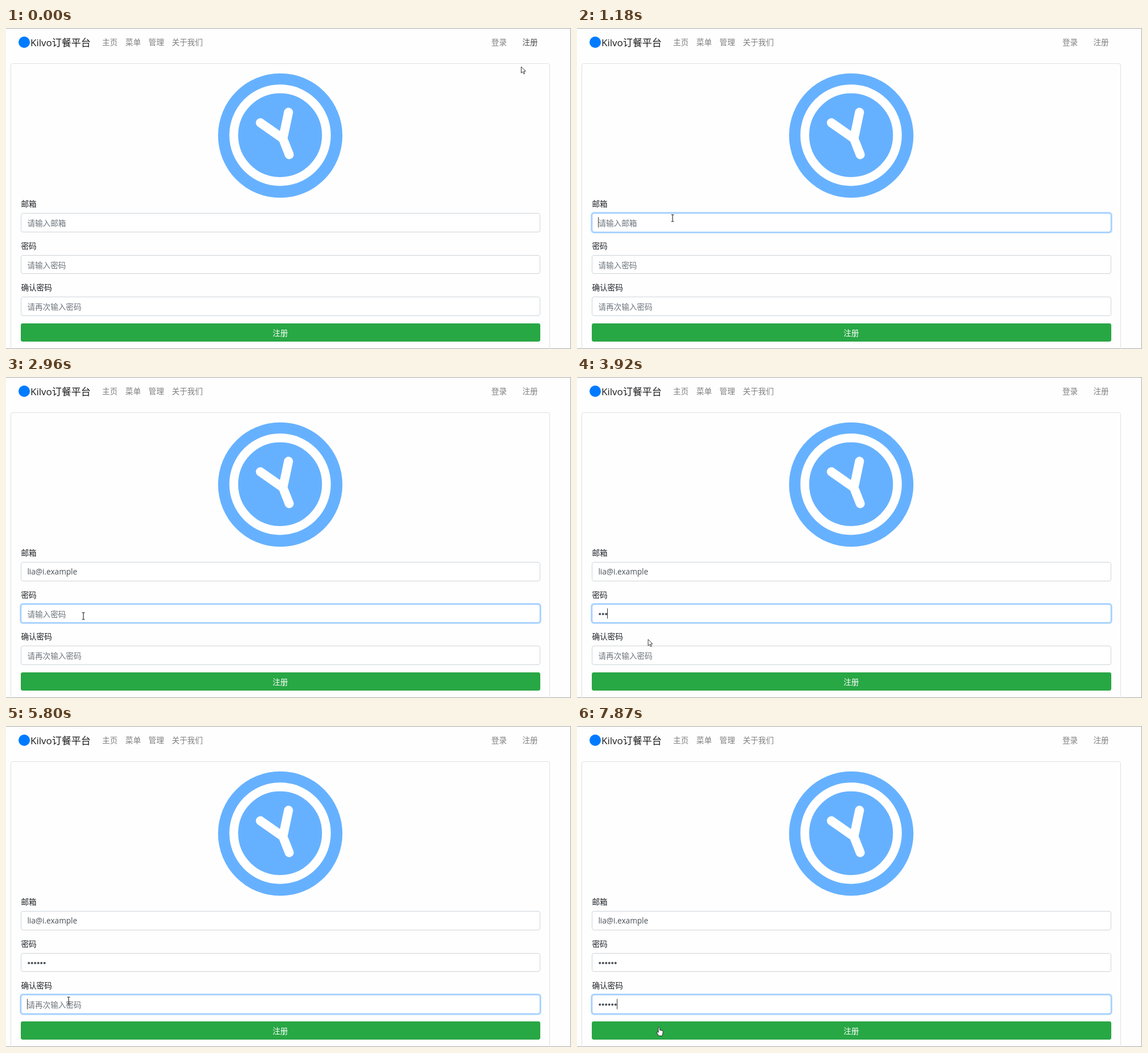
Animation of 993 by 564 pixels, one loop 8 s. Source, as an HTML page:

```html
<!DOCTYPE html>
<html lang="zh">
<head>
<meta charset="utf-8">
<title>注册</title>
<style>
  html, body { margin: 0; width: 100%; height: 100%; overflow: hidden; background: #fefefe; }
  svg { display: block; }
  text { font: 13.6px "Open Sans", "Noto Sans CJK SC", "Noto Sans CJK", sans-serif; fill: #212529; }
  .brand { font-size: 17px; fill: rgba(0, 0, 0, .9); }
  .nav { fill: rgba(0, 0, 0, .5); }
  .nav.hover { fill: rgba(0, 0, 0, .7); }
  .hint { fill: #6c757d; }
  .value { fill: #495057; }
  .button { fill: #fff; font-weight: 500; text-anchor: middle; }
</style>
</head>
<body>
<svg width="993" height="564" viewBox="0 0 993 564">
  <path d="M0 .5H992.5V563.5H0" fill="none" stroke="#a9a9a9"/>
  <rect x="8.5" y="62.5" width="947" height="520" rx="3.4" fill="none" stroke="#e0e0e0"/>
  <circle cx="32" cy="25" r="10" fill="#007bff"/>
  <text class="brand" x="43" y="32">Kilvo订餐平台</text>
  <g id="menu"></g>

  <circle cx="482" cy="189" r="109.3" fill="#66b1ff"/>
  <circle cx="481.7" cy="188.3" r="81.4" fill="none" stroke="#fff" stroke-width="15.5"/>
  <path d="M447 166.5L486.7 194.3L496.5 148M486.7 194.3L497.8 222.5" fill="none" stroke="#fff"
        stroke-width="15.8" stroke-linecap="round" stroke-linejoin="round"/>

  <g id="form"></g>
  <rect x="26" y="519" width="913" height="32" rx="3.4" fill="#28a745"/>
  <text class="button" x="482" y="541">注册</text>
  <path id="caret" stroke="#333"/>

  <g id="cursor" stroke="#222">
    <path id="arrow" d="M.5 .5V11.6L3 9.2L4.9 13.2L6.7 12.4L4.9 8.5H8.3Z" fill="#fff" stroke-width=".9"/>
    <path id="beam" d="M-2.5 -6H-.6L0 -5.5L.6 -6H2.5M0 -5.5V5.5M-2.5 6H-.6L0 5.5L.6 6H2.5" fill="none" stroke-width="1.1"/>
    <path id="hand" d="M-1.3 .9Q0 -.8 1.3 .9V5.2L5.6 6.2Q7.2 6.8 7 8.6L6.2 12.4L5.4 15.5H-.4L-4 10.2Q-4.4 8.2 -2.6 8.4L-1.3 9.6Z" fill="#fff"/>
  </g>
</svg>
<script>
const LOOP = 8000;
const SAMPLE = 145;   // pointer is redrawn about this often
const BLINK = 520;
const FOCUS_LAG = 130;
const FONT = 13.6;
const DOT_STEP = 5.5;
const EMAIL = "lia@i.example";
const $ = id => document.getElementById(id);
const snap = v => Math.floor(v) + .5;
const show = (el, on) => el.setAttribute("visibility", on ? "visible" : "hidden");

function add(parent, tag, attrs, text = "") {
  const el = document.createElementNS("http://www.w3.org/2000/svg", tag);
  for (const key in attrs) el.setAttribute(key, attrs[key]);
  el.textContent = text;
  parent.append(el);
  return el;
}

function addLinks(labels, x, gap) {
  return labels.map(label => {
    const link = add($("menu"), "text", { class: "nav", x, y: 30 }, label);
    x += label.length * FONT + gap;
    return link;
  });
}
addLinks(["主页", "菜单", "管理", "关于我们"], 169, FONT);
const register = addLinks(["登录", "注册"], 853, 2 * FONT)[1];

function addField({ label, hint, secret, ...timing }, i) {
  const form = $("form");
  const raw = 325.65 + 73.4 * i;
  const y = snap(raw), height = snap(raw + 32.9) - y;
  const box = { x: 26.5, y, width: 912, height, rx: 3.4 };
  add(form, "text", { x: 26.4, y: y - 11.5 }, label);
  add(form, "rect", { ...box, fill: "#fff", stroke: "#ced4da" });
  const ring = add(form, "g", {});
  add(ring, "rect", { x: 25.25, y: y - 1.25, width: 914.5, height: height + 2.5, rx: 4.6,
    fill: "none", stroke: "#bfdeff", "stroke-width": 2.5 });
  add(ring, "rect", { ...box, fill: "none", stroke: "#80bdff" });
  const hintText = add(form, "text", { class: "hint", x: 37.4, y: y + 22 }, hint);
  const value = add(form, "text", { class: "value", x: 37.4, y: y + 21.5 });
  const dots = !secret ? [] : Array.from({ length: 6 }, (_, n) =>
    add(form, "circle", { cx: 40.2 + n * DOT_STEP, cy: y + 17, r: 1.95, fill: "#495057" }));
  return { ...timing, secret, size: secret ? 6 : EMAIL.length, y, height, ring, hintText, value, dots };
}

// Each field is clicked, then filled at a steady pace.
const fields = [
  { label: "邮箱", hint: "请输入邮箱", click: 1020, start: 1330, pace: 45 },
  { label: "密码", hint: "请输入密码", secret: true, click: 2440, start: 3240, pace: 330 },
  { label: "确认密码", hint: "请再次输入密码", secret: true, click: 5670, start: 6400, pace: 265 }
].map(addField);

// Time and place of each turn of the pointer
const path = [
  [0, 905, 67.5], [720, 280, 410], [1020, 168, 334], [1870, 168, 334],
  [2440, 136, 420], [3500, 136, 420], [3920, 124.5, 460.5], [4790, 128, 432],
  [5370, 110, 482], [7480, 110, 483], [7870, 144.3, 529]
];

function pointerAt(t) {
  const next = path.findIndex(point => point[0] > t);
  if (next < 0) return path[path.length - 1].slice(1);
  const [t0, x0, y0] = path[next - 1], [t1, x1, y1] = path[next];
  const steps = Math.round((t1 - t0) / SAMPLE);
  const p = Math.floor((t - t0) / (t1 - t0) * steps) / steps;
  return [x0 + (x1 - x0) * p, y0 + (y1 - y0) * p];
}

function drawPointer(t) {
  const [x, y] = pointerAt(t);
  const inField = fields.some(f => y >= f.y && y <= f.y + f.height);
  const kind = y > 518 ? "hand" : inField ? "beam" : "arrow";
  for (const id of ["arrow", "beam", "hand"]) show($(id), id === kind);
  $("cursor").setAttribute("transform", `translate(${x} ${y})`);
  register.classList.toggle("hover", x > 890 && y < 80);
}

const typedAt = (field, t) =>
  Math.max(0, Math.min(field.size, Math.floor((t - field.start) / field.pace) + 1));

const activeAt = t => fields.filter(field => field.click <= t).pop();

function drawField(field, t) {
  const count = typedAt(field, t);
  show(field.ring, field === activeAt(t - FOCUS_LAG));
  show(field.hintText, count === 0);
  if (!field.secret) field.value.textContent = EMAIL.slice(0, count);
  field.dots.forEach((dot, n) => show(dot, n < count));
}

function drawCaret(t) {
  const field = activeAt(t);
  if (!field) return show($("caret"), false);
  const count = typedAt(field, t);
  const lastInput = count ? field.start + (count - 1) * field.pace : field.click;
  const width = field.secret ? count * DOT_STEP : field.value.getComputedTextLength();
  show($("caret"), Math.floor((t - lastInput) / BLINK) % 2 === 0);
  $("caret").setAttribute("d", `M${snap(37 + width)} ${field.y + 7}v18`);
}

const begin = performance.now();
function tick() {
  const t = (performance.now() - begin) % LOOP;
  fields.forEach(field => drawField(field, t));
  drawCaret(t);
  drawPointer(t);
  requestAnimationFrame(tick);
}
tick();
</script>
</body>
</html>
```
